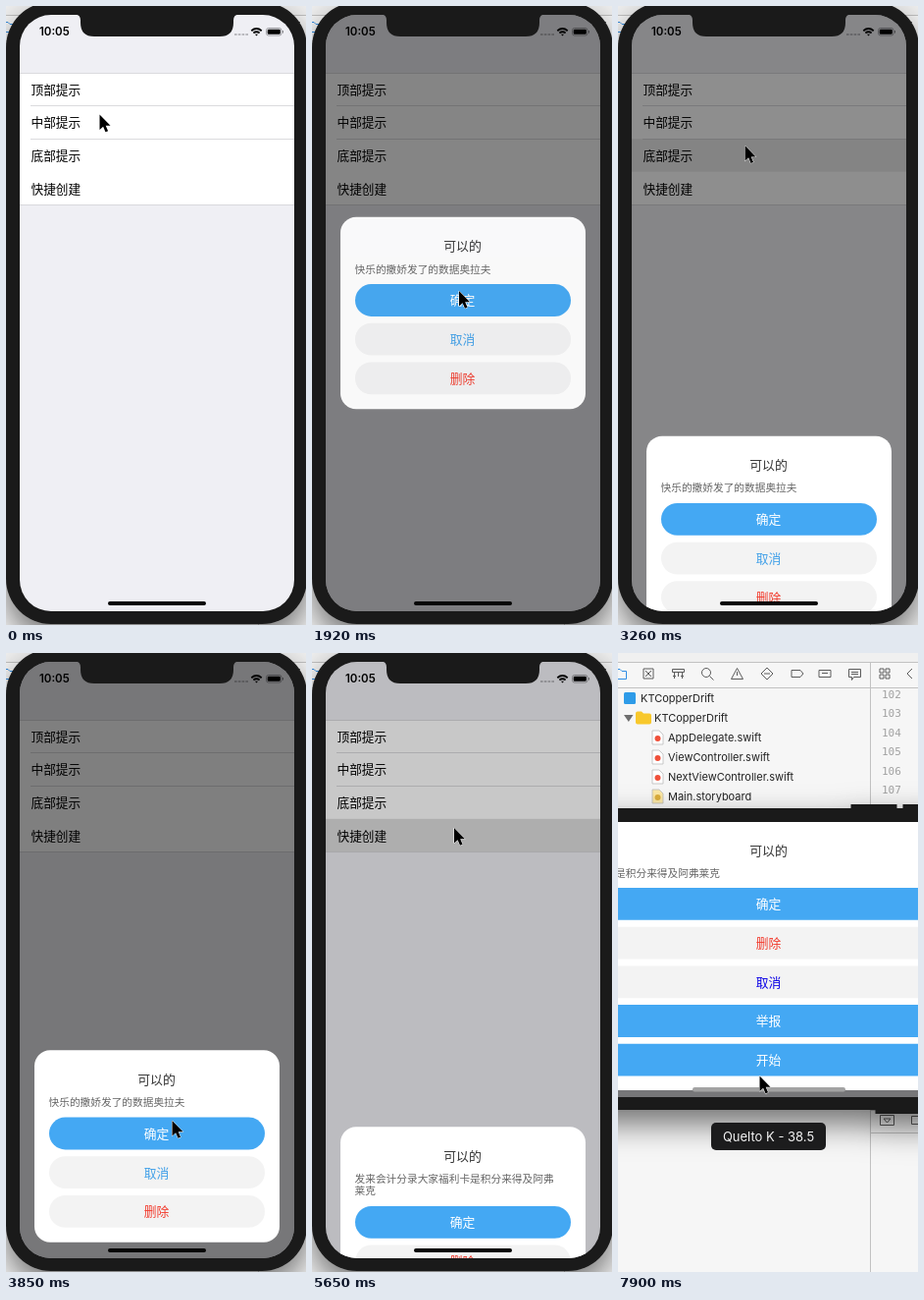
An HTML page for the animation above (8 s loop, 306 px wide and 630 px high).

```html
<!DOCTYPE html>
<html lang="zh">
<head>
<meta charset="utf-8">
<title>Dialog demo</title>
<style>
  html, body { margin: 0; width: 100%; height: 100%; overflow: hidden; background: #f6f6f6; }
  svg { display: block; width: 306px; height: 630px; }
  text { font-family: Inter, "Noto Sans", sans-serif; }
  .cjk { font-family: "Noto Sans CJK SC", "Noto Sans CJK", "Noto Sans SC", sans-serif; }
  .code { font: 11px "DejaVu Sans Mono", monospace; fill: #a2a2a2; }
  .line { fill: none; stroke: #5c5c5c; }
  .shadow { filter: drop-shadow(0 14px 16px rgba(0, 0, 0, .55)); }
</style>
</head>
<body>
<svg viewBox="0 0 306 630">
  <defs>
    <clipPath id="screenClip"><rect x="14" y="9" width="280" height="607" rx="32"/></clipPath>
  </defs>

  <g id="editor">
    <rect width="306" height="630" fill="#f6f6f6"/>
    <rect width="306" height="9" fill="#f0f0f0"/>
    <path d="M0 9.5H306M0 35.5H306M257.5 9V630M258 465.5H306M258 488.5H306" fill="none" stroke="#c2c2c2"/>
    <g class="line">
      <path d="M-4 16.500H2L4 18.500H8.500V26.500H-4Z" stroke="#2f8de4"/>
      <path d="M26 16h10v10h-10zM28 18l6 6M34 18l-6 6M55.500 16.500h12v3h-12zM57.500 20v6M65.500 20v6M56 23.500h3M64 23.500h3M61.500 20v4"/>
      <circle cx="90" cy="20" r="4.500"/><path d="M93.500 23.500l4 4"/>
      <path d="M121.500 15.500l6 11h-12zM121.500 19v4M152 15l6 6-6 6-6-6zM149 21h6M177 17.500h9l3 3.500-3 3.500h-9z"/>
      <path d="M235.500 16.500h12v8h-7l-2 3v-3h-3zM238 19.500h7M238 21.500h7"/>
      <path d="M205 17.500h12v7h-12zM208 20.500h6M267 16h4v4h-4zM273 16h4v4h-4zM267 22h4v4h-4zM273 22h4v4h-4zM300 16l-5 5 5 5"/>
      <path d="M267.500 470.500h14v10h-14zM271 474l3.500 4 3.500-4zM299.500 471.500h9v8h-9z"/>
    </g>
    <rect x="6" y="40" width="12" height="12" rx="1.500" fill="#2d9be8"/>
    <path d="M6 63h9.500l-4.700 7z" fill="#6e6e6e"/>
    <path d="M18 61.500q0-2 2-2h4l2 2h6q2 0 2 2v7q0 2-2 2H20q-2 0-2-2z" fill="#f8c82c"/>
  </g>

  <g class="shadow"><g class="turn" fill="#1a1a1a">
    <rect x="0" y="-4" width="307" height="633" rx="46"/>
    <path d="M-4 130h6v45h-6zM-4 181h6v47h-6zM305 130h6v73h-6z"/>
  </g></g>

  <g class="turn">
    <g clip-path="url(#screenClip)">
      <rect x="14" y="9" width="280" height="607" fill="#efeff4"/>
      <rect x="14" y="68" width="280" height="134" fill="#fff"/>
      <rect id="highlight" x="14" width="280" height="33.500" fill="#d9d9d9"/>
      <path d="M14 68.500H294M25 101.500H294M25 135.500H294M14 202.500H294" stroke="#d2d2d6" stroke-width=".8"/>
      <g id="rows"></g>
      <text x="34" y="30.200" font-size="11.500" font-weight="600">10:05</text>
      <path d="M233 29h14" stroke="#b9b9be" stroke-width="2" stroke-dasharray="2.600 1.200"/>
      <g fill="none" stroke="#000" stroke-width="1.800">
        <path d="M250.300 25.200q5.200-4.400 10.400 0M252.400 27.500q3.100-2.500 6.200 0"/>
        <path d="M254 28.800h3l-1.500 1.800z" fill="#000" stroke="none"/>
      </g>
      <rect x="265.500" y="22.500" width="15.500" height="7.500" rx="2.200" fill="none" stroke="#8a8a8e" stroke-width=".8"/>
      <rect x="266.700" y="23.700" width="13.100" height="5.100" rx="1.200"/>
      <path d="M282.500 25v2.600" stroke="#8a8a8e"/>
      <rect id="dim" x="14" y="9" width="280" height="607"/>
      <g id="popups"></g>
      <rect x="104" y="606" width="100" height="4" rx="2" fill="#050505"/>
      <g id="wide" transform="rotate(-90 153 312.500) translate(0 1.500)">
        <rect x="-152" y="170" width="610" height="284" fill="#777779"/>
      </g>
    </g>
    <path d="M70 8.500q6 0 6 6v2.500q0 14 14 14h128q14 0 14-14v-2.500q0-6 6-6z" fill="#1a1a1a"/>
  </g>

  <g id="label">
    <rect x="95" y="478" width="117" height="28" rx="5" fill="#1c1c1d"/>
    <text x="153.500" y="497" font-size="13" fill="#f2f2f2" text-anchor="middle">Quelto K - 38.5</text>
  </g>
  <path id="cursor" d="M0 0V15.500L3.600 12.200 6 17.800 8.600 16.800 6.200 11.300H11Z" stroke="#fff" stroke-width="1" paint-order="stroke"/>
</svg>

<script>
const LOOP = 8000;
const BLUE = '#44a8f3', PALE = '#f3f3f3';
const $ = id => document.getElementById(id);
const clamp = v => Math.max(0, Math.min(1, v));
const smooth = v => { v = clamp(v); return v * v * (3 - 2 * v); };
const ramp = (t, a, b) => smooth((t - a) / (b - a));

function add(parent, tag, attrs, content = '') {
  const el = document.createElementNS('http://www.w3.org/2000/svg', tag);
  for (const name in attrs) el.setAttribute(name, attrs[name]);
  el.textContent = content;
  return parent.appendChild(el);
}

// Chinese text, centred vertically on y
function cjk(parent, x, y, size, content, fill, anchor = 'start') {
  return add(parent, 'text', {
    class: 'cjk', x, y: y + size * .375, 'font-size': size, fill, 'text-anchor': anchor
  }, content);
}

function addButtons(parent, x, y, width, buttons) {
  buttons.forEach(([label, fill, color], i) => {
    const top = y + i * 39.7;
    add(parent, 'rect', { x, y: top, width, height: 32.8, rx: 16.4, fill });
    cjk(parent, 153.5, top + 16.4, 12.8, label, color, 'middle');
  });
}

function addPopup(top, height, lines, buttons) {
  const g = add($('popups'), 'g', {});
  add(g, 'rect', { x: 29, y: top, width: 250, height, rx: 16, fill: '#fff' });
  cjk(g, 153.5, top + 29.7, 12.9, '可以的', '#333', 'middle');
  lines.forEach((line, i) => cjk(g, 43.5, top + 52.8 + i * 12.3, 10.7, line, '#666'));
  addButtons(g, 44, top + 68.3 + (lines.length - 1) * 12.3, 220, buttons);
  return g;
}

const OK = ['确定', BLUE, '#fff'];
const CANCEL = ['取消', PALE, '#3f9fe8'];
const REMOVE = ['删除', PALE, '#f23a2c'];
const MANY = [OK, REMOVE, ['取消', PALE, '#0a00e6'], ['举报', BLUE, '#fff'], ['开始', BLUE, '#fff']];
const SHORT = ['快乐的撒娇发了的数据奥拉夫'];
const LONG = ['发来会计分录大家福利卡是积分来得及阿弗', '莱克'];

['顶部提示', '中部提示', '底部提示', '快捷创建'].forEach((label, i) =>
  cjk($('rows'), 25.5, 85 + i * 33.6, 12.7, label, '#000'));

const popups = [
  { el: addPopup(214.8, 195.4, SHORT, [OK, CANCEL, REMOVE]), row: 1, open: [540, 950], close: [1880, 2200], fade: true },
  { el: addPopup(404.3, 195.4, SHORT, [OK, CANCEL, REMOVE]), row: 2, open: [2900, 3350], close: [4360, 4590] },
  { el: addPopup(312.8, 287, LONG, MANY), row: 3, open: [5440, 5900], close: [9000, 9300] }
];

// Landscape layout of the last popup
const wide = $('wide');
add(wide, 'rect', { x: -136, y: 165, width: 578, height: 280, rx: 16, fill: '#fff' });
cjk(wide, 153.5, 201, 12.9, '可以的', '#333', 'middle');
cjk(wide, 104, 223.5, 10.7, LONG.join(''), '#666', 'end');
addButtons(wide, -121, 239, 548, MANY);
add(wide, 'rect', { x: 76, y: 442, width: 156, height: 4.5, rx: 2.2, fill: '#a3a3a3' });

// Project tree and line numbers
const editor = $('editor');
[['KTCopperDrift', 23], ['KTCopperDrift', 37], ['AppDelegate.swift', 51], ['ViewController.swift', 51],
 ['NextViewController.swift', 51], ['Main.storyboard', 51]].forEach(([name, x], i) => {
  const y = 46 + i * 20;
  add(editor, 'text', { x, y: y + 4, 'font-size': 11, fill: '#222' }, name);
  if (i < 2) return;
  add(editor, 'path', { d: `M35 ${y - 7}h7l4 4v10h-11z`, fill: i < 5 ? '#fff' : '#fbe7a5', stroke: '#bbb', 'stroke-width': .8 });
  add(editor, 'circle', { cx: 40.5, cy: y + 1, r: 3, fill: i < 5 ? '#f0503a' : '#dcae3c' });
});
for (let i = 0; i < 6; i++)
  add(editor, 'text', { class: 'code', x: 269, y: 46 + i * 19.4 }, 102 + i);

// The screen refreshes in bursts: [first, last, number of steps]
const bursts = [[300, 300, 1], [600, 1620, 8], [1920, 2660, 6], [2960, 3850, 7],
                [4450, 5050, 5], [5500, 6400, 7], [6550, 6550, 1], [7450, 7900, 4]];

function heldTime(t) {
  let held = 0;
  for (const [first, last, count] of bursts) {
    if (t < first) break;
    const gap = (last - first) / (count - 1) || 1;
    held = first + gap * Math.min(count - 1, Math.floor((t - first) / gap + .02));
  }
  return held;
}

const cursorPath = [
  [0, 95.5, 110.5], [300, 95.5, 111], [950, 95.5, 111], [1600, 150, 290], [2000, 150, 290],
  [2650, 129.5, 142], [3250, 129.5, 142], [3850, 169.5, 476], [4420, 169.5, 476],
  [4600, 141.5, 278.5], [5050, 145, 178], [5700, 145, 178], [6400, 137.5, 392], [6550, 144.5, 430.5]
];

function cursorAt(t) {
  const i = cursorPath.findIndex(key => key[0] > t);
  if (i < 0) return cursorPath.at(-1).slice(1);
  const [t0, x0, y0] = cursorPath[i - 1], [t1, x1, y1] = cursorPath[i];
  const p = ramp(t, t0, t1);
  return [x0 + (x1 - x0) * p, y0 + (y1 - y0) * p];
}

function render(time) {
  const t = heldTime(time);
  let dim = 0, glow = 0;
  for (const { el, row, open, close, fade } of popups) {
    const shown = ramp(t, ...open) * (1 - ramp(t, ...close));
    el.setAttribute('visibility', shown > 0 ? 'visible' : 'hidden');
    if (fade) el.setAttribute('opacity', shown);
    else el.setAttribute('transform', `translate(0 ${(1 - shown) * 300})`);
    dim = Math.max(dim, shown);
    if (t >= open[0] && t < open[0] + 600) {
      glow = clamp(1 - (t - open[0] - 160) / 400);
      $('highlight').setAttribute('y', 68 + row * 33.6);
    }
  }
  $('dim').setAttribute('opacity', dim * .5);
  $('highlight').setAttribute('opacity', glow);

  const turn = ramp(t, 7350, 7890);
  for (const el of document.querySelectorAll('.turn'))
    el.setAttribute('transform', `translate(0 ${-1.5 * turn}) rotate(${90 * turn} 153 312.5)`);
  wide.setAttribute('opacity', clamp((turn - .4) / .4));
  $('label').setAttribute('visibility', turn === 1 ? 'visible' : 'hidden');

  $('cursor').setAttribute('transform', `translate(${cursorAt(t)})`);
}

const start = performance.now();
function tick() {
  render((performance.now() - start) % LOOP);
  requestAnimationFrame(tick);
}
tick();
</script>
</body>
</html>
```
